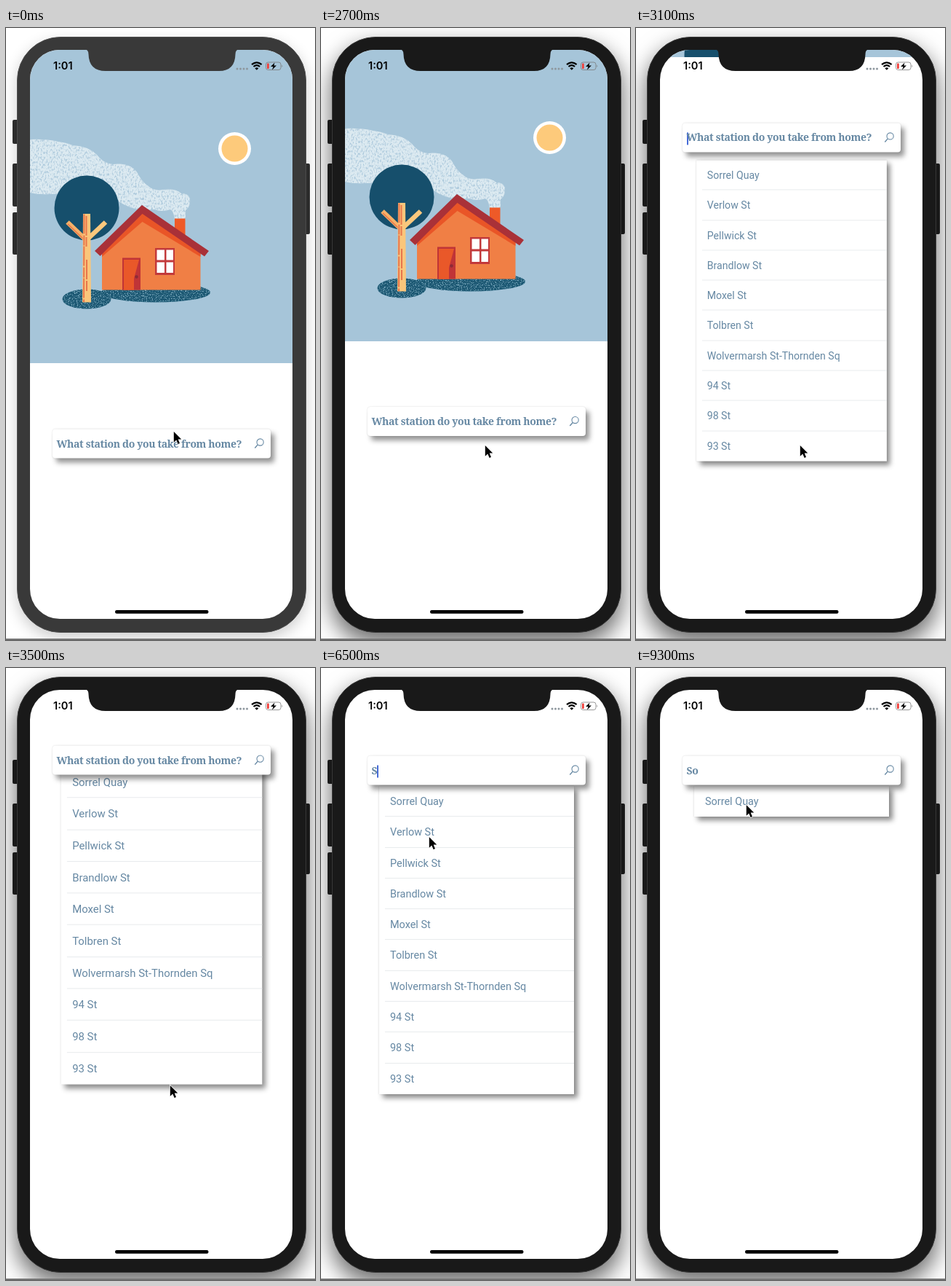
An HTML page for the animation above (9.5 s loop, 425 by 840 pixels).

```html
<!DOCTYPE html>
<html lang="en">
<head>
<meta charset="utf-8">
<title>Station search</title>
<style>
  html, body { margin: 0; width: 100%; height: 100%; overflow: hidden; background: #fff; }
  div, svg { position: absolute; box-sizing: border-box; }
  #stage { left: 0; top: 0; width: 425px; height: 840px; overflow: hidden; }

  .phone { left: 15px; top: 12px; width: 397.5px; height: 818px; border-radius: 60px;
    background: #393939; border: 1px solid #4c4c4c;
    box-shadow: 0 7px 20px rgba(0,0,0,.2); }
  .key { width: 8px; background: #303030; border-radius: 2px; }
  .active .phone { background: #191919; border-color: #383838; box-shadow: 0 14px 30px 2px rgba(0,0,0,.56); }
  .active .key { background: #222; }
  .edge { left: 0; top: 838px; width: 425px; height: 2px; background: #777; }

  .screen { left: 33px; top: 30px; width: 361px; height: 781px; border-radius: 41px;
    overflow: hidden; background: #fff; }
  #hero { left: 0; top: 0; width: 361px; overflow: hidden; background: #a6c5d9; }
  #hero svg { left: 0; top: 50%; margin-top: -215px; }

  #list { left: 47px; top: 131.5px; width: 268px; background: #fff;
    transform-origin: 50% 211.5px; box-shadow: 5px 5px 7px rgba(0,0,0,.46), 0 0 2px rgba(0,0,0,.14); }
  .row { position: relative; height: 42.3px; padding-left: 15px;
    font: 14.45px/44px Roboto, sans-serif; color: #6688a3; white-space: nowrap; }
  .row:not(:last-child)::after { content: ""; position: absolute; left: 8px; right: 0; bottom: 0;
    height: 1px; background: #e8ebed; }
  .filtered .row:not(:first-child), .filtered .row::after { display: none; }

  #search { left: 31px; top: 0; width: 300px; height: 39.5px; padding-left: 5.5px; border-radius: 4px;
    background: #fff; box-shadow: 5px 6px 7px rgba(0,0,0,.42), 0 0 2px rgba(0,0,0,.16);
    font: bold 14px/39.5px "Noto Serif", serif; letter-spacing: -.025em; color: #6688a3; white-space: nowrap; }
  #caret { display: inline-block; width: 2px; height: 17px; margin-right: -2px;
    vertical-align: middle; background: #466bd8; }

  #overlay { left: 0; top: 0; }
  .clock { font: 600 14.6px Inter, sans-serif; }
</style>
</head>
<body>
<div id="stage">
  <div class="key" style="left:9px;top:126px;height:33px"></div>
  <div class="key" style="left:9px;top:186px;height:59px"></div>
  <div class="key" style="left:9px;top:253px;height:58px"></div>
  <div class="key" style="left:409.5px;top:186px;height:97px"></div>
  <div class="phone"></div>
  <div class="edge"></div>

  <div class="screen">
    <div id="hero">
      <svg width="361" height="430" viewBox="33 30 361 430">
        <defs>
          <filter id="mist" color-interpolation-filters="sRGB" x="0" y="0" width="1" height="1">
            <feTurbulence type="fractalNoise" baseFrequency=".5 .3" numOctaves="3" seed="5"/>
            <feColorMatrix values="0 0 0 0 .65  0 0 0 0 .77  0 0 0 0 .85  3 0 0 0 -1.4"/>
            <feComposite in2="SourceAlpha" operator="in" result="n"/>
            <feMerge><feMergeNode in="SourceGraphic"/><feMergeNode in="n"/></feMerge>
          </filter>
          <filter id="grain" color-interpolation-filters="sRGB" x="0" y="0" width="1" height="1">
            <feTurbulence type="fractalNoise" baseFrequency=".7" numOctaves="2" seed="8"/>
            <feColorMatrix values="0 0 0 0 .6  0 0 0 0 .76  0 0 0 0 .83  4 0 0 0 -2.1"/>
            <feComposite in2="SourceAlpha" operator="in" result="n"/>
            <feMerge><feMergeNode in="SourceGraphic"/><feMergeNode in="n"/></feMerge>
          </filter>
        </defs>
        <path filter="url(#mist)" fill="#dceaf1" d="M33 153Q55 152 72 156Q82 157 92 161Q113 162 125 174Q134 186 147 187
          Q174 184 183 203Q189 213 196 217Q202 224 216 222Q233 220 241 227Q254 227 253 239Q252 247 247 250V263H232
          Q231 252 226 249Q214 253 204 249L187 250Q168 247 155 238L110 235Q80 226 60 228Q45 229 33 226Z"/>
        <circle cx="314.5" cy="165.5" r="22.5" fill="#fff"/>
        <circle cx="314.5" cy="165.5" r="18" fill="#fdca7b"/>
        <g fill="#1c5873" filter="url(#grain)">
          <ellipse cx="206" cy="363" rx="75" ry="13.5"/>
          <ellipse cx="111" cy="372" rx="33.5" ry="13.5"/>
        </g>
        <circle cx="111" cy="247" r="44.5" fill="#164f6c"/>
        <g fill="none" stroke-width="6.5">
          <path d="M84.5 266.5 109 290" stroke="#f6b168"/>
          <path d="M85 269 108 291" stroke="#e9764c" stroke-width="1.5"/>
          <path d="M137 266.5 114 288" stroke="#fac87d"/>
        </g>
        <path d="M106 255H116L117 376.5H105Z" fill="#fac67b"/>
        <path d="M107.5 255.5 107 376M110.5 258V300M111 318V362" stroke="#e8764d" stroke-width="2" stroke-dasharray="27 2 14 1"/>
        <path d="M232 261.5H246.5V300H232Z" fill="#ee5a28"/>
        <path d="M132 359.5V302L187 250 267.5 308V359.5Z" fill="#f07f45"/>
        <path d="M132 314V300L187 250 267.5 306V314L187.5 266Z" fill="#e95527"/>
        <path d="M187 243 279 306 273 313.5 187.5 255 129.5 313 122 306Z" fill="#a93138"/>
        <path d="M160 315.5H185V359.5H160Z" fill="#c03437"/>
        <path d="M162 318H183L176 344V359.5H162Z" fill="#e95829"/>
        <circle cx="179.5" cy="341.5" r="2.3" fill="#8e2b36"/>
        <path d="M205 302H232V339H205Z" fill="#c2393a"/>
        <path d="M207.5 304.5H218V318.5H207.5ZM220.5 304.5H230V318.5H220.5ZM207.5 321.5H218V336H207.5ZM220.5 321.5H230V336H220.5Z" fill="#fff"/>
      </svg>
    </div>
    <div id="list"></div>
    <div id="search"><span id="typed"></span><i id="caret"></i><span id="hint">What station do you take from home?</span>
      <svg style="left:276px;top:11px" width="18" height="18" fill="none" stroke="#6688a3" stroke-width="1.1">
        <circle cx="9.6" cy="7" r="4.6"/><path d="M6.3 10.4 2.3 15" stroke-width="1.4"/>
      </svg>
    </div>
  </div>

  <svg id="overlay" width="425" height="840">
    <path id="notch" d="M107 29Q113.5 29 113.5 36Q114 59 137 59H293Q315 59 315.5 36Q315.5 29 322 29Z"/>
    <text class="clock" x="65" y="57">1:01</text>
    <g fill="#8d979e"><circle cx="318" cy="56" r="1.5"/><circle cx="322.5" cy="56" r="1.5"/><circle cx="327" cy="56" r="1.5"/><circle cx="331.5" cy="56" r="1.5"/></g>
    <path d="M338 50.2Q344.8 44.4 351.6 50.2M340.5 53Q344.8 49.4 349.1 53" fill="none" stroke="#000" stroke-width="2.2"/>
    <path d="M342.3 55.3Q344.8 53.3 347.3 55.3L344.8 57.8Z"/>
    <rect x="357.5" y="47" width="20.5" height="10.5" rx="3" fill="none" stroke="#777" stroke-opacity=".75"/>
    <path d="M379.5 50.5Q381.3 52.2 379.5 54Z" fill="#777"/>
    <rect x="359" y="48.5" width="2.8" height="7.5" rx="1" fill="#f0403c"/>
    <path d="M369.5 47.5 364 53H367.5L366 57.5 372 51.5H368.5Z"/>
    <rect x="150" y="799" width="128.5" height="4.7" rx="2.3"/>
    <g id="pointer"><path transform="translate(.8 1) scale(.87)" d="M0 0V17L4 13.3 6.7 19.5 9.4 18.3 6.8 12.2H12Z" stroke="#fff" stroke-width="1.6" paint-order="stroke"/></g>
  </svg>
</div>
<script>
  const LOOP = 9500, STEP = 100, HERO = 430;
  const stations = ["Sorrel Quay", "Verlow St", "Pellwick St", "Brandlow St", "Moxel St", "Tolbren St",
    "Wolvermarsh St-Thornden Sq", "94 St", "98 St", "93 St"];
  // time, x, y of the pointer tip
  const track = [[0, 230, 553], [500, 226, 566], [800, 226, 566], [1200, 225, 572], [4400, 225, 572],
    [4500, 177, 492], [4800, 149, 406], [5000, 149, 406], [5700, 148, 231], [8000, 148, 231],
    [8500, 153, 187], [9000, 153, 187], [9150, 151, 187], [LOOP, 151, 187]];
  const caretOn = [[2800, 3400], [3900, 4500], [4900, 5400], [5900, 7700], [8200, 8700]];

  const $ = id => document.getElementById(id);
  const stage = $("stage"), hero = $("hero"), list = $("list"), search = $("search");
  for (const name of stations) {
    const row = document.createElement("div");
    row.className = "row";
    row.textContent = name;
    list.append(row);
  }

  // underdamped spring from 0 to 1
  function spring(ms) {
    if (ms <= 0) return 0;
    const a = ms * 0.0047, k = 0.915;
    return 1 - Math.exp(-k * a) * (Math.cos(a) + k * Math.sin(a));
  }

  function pointerAt(t) {
    const i = track.findIndex(p => p[0] > t);
    const [t0, x0, y0] = track[i - 1], [t1, x1, y1] = track[i];
    const u = (t - t0) / (t1 - t0), e = u * u * (3 - 2 * u);
    return [x0 + (x1 - x0) * e, y0 + (y1 - y0) * e];
  }

  function draw(t) {
    const p = spring(t - 2635), rest = HERO * (1 - p);
    const typed = t < 6200 ? "" : t < 7000 ? "S" : "So";
    stage.classList.toggle("active", t >= 1900);
    $("notch").setAttribute("fill", t >= 1900 ? "#191919" : "#393939");
    hero.style.height = Math.max(0, rest) + "px";
    search.style.transform = `translateY(${rest + 90.5}px)`;
    list.style.transform = `translateY(${rest * 1.46}px) scale(${p})`;
    list.style.visibility = p > 0 ? "visible" : "hidden";
    list.classList.toggle("filtered", typed === "So");
    $("typed").textContent = typed;
    $("hint").style.display = typed ? "none" : "";
    $("caret").style.visibility = caretOn.some(([a, b]) => t >= a && t < b) ? "visible" : "hidden";
    $("pointer").setAttribute("transform", `translate(${pointerAt(t)})`);
  }

  const start = performance.now();
  function tick() {
    const t = (performance.now() - start) % LOOP;
    draw(Math.floor(t / STEP) * STEP);
    requestAnimationFrame(tick);
  }
  tick();
</script>
</body>
</html>
```
